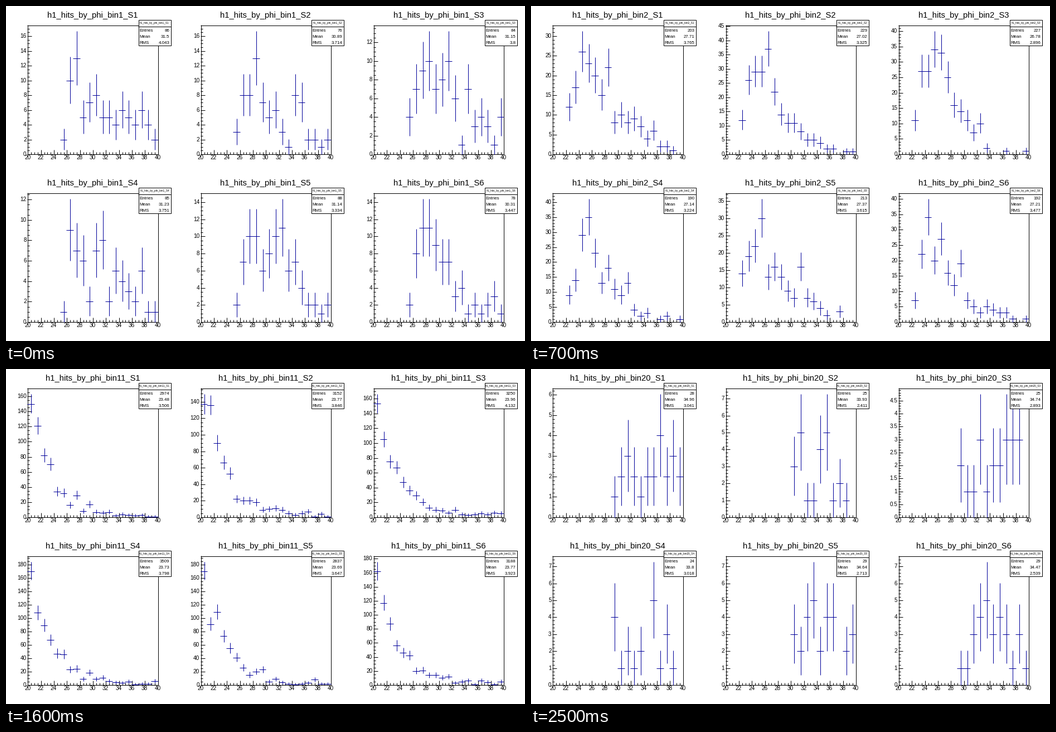
Recreate the animation shown at these times as a matplotlib script. Size 931 by 601 pixels, loop 2.6 s.

```python
import numpy as np
import matplotlib.pyplot as plt
from matplotlib.animation import FuncAnimation
from matplotlib.collections import LineCollection
from matplotlib.patches import Rectangle

W, H, DPI = 931, 601, 64
PX = 72 / DPI
BLUE = "#000099"
PLOT_W, PLOT_H = 233.3, 231
PANELS = [(38.4 + 310.33 * column, bottom)
          for bottom in (265, 566) for column in range(3)]
X = np.arange(20.5, 40)

# The slides run through bins 1-6 once, then through all twenty.
SEQUENCE = [*range(1, 7), *range(1, 21)]

# Typical number of entries along the phi bins.
KEY_BINS = (1, 2, 4, 8, 14, 18, 20)
KEY_ENTRIES = (78, 198, 826, 4135, 2325, 187, 25)


def profile(phi_bin):
    """Outer bins switch on at a threshold; inner ones just fall off."""
    depth = min(phi_bin, 20 - phi_bin)
    if depth > 3:
        return np.exp(-(X - 20.5) / 3.3) + 0.014
    start = 20 + (3 - depth) * (6 - depth) / 2
    u = np.maximum(X - start, 0) / (4.6 - 0.9 * depth)
    return u * np.exp(1 - u)


def histogram(phi_bin, sector):
    """Return counts, entries, mean and RMS."""
    rng = np.random.default_rng(100 * phi_bin + sector)
    typical = np.exp(np.interp(phi_bin, KEY_BINS, np.log(KEY_ENTRIES)))
    entries = round(typical * rng.normal(1, 0.08))
    shape = profile(phi_bin)
    visible = min(0.95 * entries, 650)
    counts = rng.poisson(visible * shape / shape.sum())
    mean = np.average(X, weights=counts)
    rms = np.sqrt(np.average((X - mean) ** 2, weights=counts))
    return counts, max(entries, counts.sum()), mean, rms


def nice_step(raw):
    power = 10.0 ** np.floor(np.log10(raw) + 1e-9)
    for limit, step in ((1, 1), (2.5, 2), (5, 5), (10, 10)):
        if raw / power <= limit + 1e-6:
            return step * power


def ticks(low, high):
    """Yield (value, is_major) along an axis."""
    major = nice_step((high - low) / 10)
    minor = nice_step(major / 5)
    per_major = round(major / minor)
    for i in range(int((high - low) / minor + 1e-6) + 1):
        yield low + i * minor, i % per_major == 0


def hline(x0, x1, y):
    y = np.floor(y + 0.5) + 0.5
    return (round(x0), y), (round(x1) + 1, y)


def vline(x, y0, y1):
    x = np.floor(x + 0.5) + 0.5
    return (x, round(y0)), (x, round(y1) + 1)


fig = plt.figure(figsize=(W / DPI, H / DPI), dpi=DPI, facecolor="white")
ax = fig.add_axes([0, 0, 1, 1])
ax.set(xlim=(0, W), ylim=(H, 0))
ax.axis("off")


def text(x, y, s, size, ha="center"):
    return ax.text(x, y, s, fontsize=size * PX, ha=ha, va="baseline",
                   family="Liberation Sans", color="black", zorder=5)


def lines(segments, color, zorder):
    return ax.add_collection(LineCollection(
        segments, colors=color, linewidths=PX, zorder=zorder,
        capstyle="butt"), autolim=False)


def x_pos(left, value):
    return left + (value - 20) / 20 * PLOT_W


def box_corner(left, bottom):
    return round(left + 198.6), bottom - 241


def draw_fixed(left, bottom):
    right, top = left + PLOT_W, bottom - PLOT_H
    segments = [hline(left, right, top), hline(left, right, bottom),
                vline(left, top, bottom), vline(right, top, bottom)]
    for value, major in ticks(20, 40):
        x = x_pos(left, value)
        segments.append(vline(x, bottom - (7 if major else 3), bottom))
        if major:
            text(x + 0.3, bottom + 10, f"{value:g}", 10)
    lines(segments, "black", 1)

    box_x, box_y = box_corner(left, bottom)
    ax.add_patch(Rectangle((box_x + 0.5, box_y + 0.5), 58, 46, facecolor="white",
                           edgecolor="black", linewidth=PX, zorder=3))
    lines([hline(box_x, box_x + 58, box_y + 12)], "black", 4)
    for row, label in enumerate(("Entries", "Mean", "RMS")):
        text(box_x + 2.7, box_y + 21.7 + 11 * row, label, 7.9, "left")


def draw_histogram(phi_bin, sector):
    left, bottom = PANELS[sector]
    counts, entries, mean, rms = histogram(phi_bin, sector)
    y_max = 1.05 * (counts.max() + np.sqrt(counts.max()))
    scale = PLOT_H / y_max
    artists, axis, marks = [], [], []

    for value, major in ticks(0, y_max):
        y = bottom - value * scale
        axis.append(hline(left, left + (7 if major else 3), y))
        if major:
            artists.append(text(left - 1.7, y + 4, f"{value:g}", 10, "right"))

    for x, n in zip(X, counts):
        if n:
            y, error = bottom - n * scale, np.sqrt(n) * scale
            marks.append(hline(x_pos(left, x - 0.5), x_pos(left, x + 0.5), y))
            marks.append(vline(x_pos(left, x), y - error, min(y + error, bottom)))

    name = f"h1_hits_by_phi_bin{phi_bin}_S{sector + 1}"
    box_x, box_y = box_corner(left, bottom)
    artists += [lines(axis, "black", 1), lines(marks, BLUE, 2),
                text(left + PLOT_W / 2 + 0.3, bottom - 244, name, 14.7),
                text(box_x + 29.5, box_y + 7.7, name, 4.8)]
    for row, value in enumerate((entries, mean, rms)):
        artists.append(text(box_x + 56.5, box_y + 21.7 + 11 * row,
                            f"{value:.4g}", 7.9, "right"))
    return artists


for panel in PANELS:
    draw_fixed(*panel)

shown = []


def update(frame):
    while shown:
        shown.pop().remove()
    for sector in range(len(PANELS)):
        shown.extend(draw_histogram(SEQUENCE[frame], sector))
    return shown


anim = FuncAnimation(fig, update, frames=len(SEQUENCE), interval=100,
                     init_func=lambda: [], repeat=True, repeat_delay=0)
plt.show()
```
